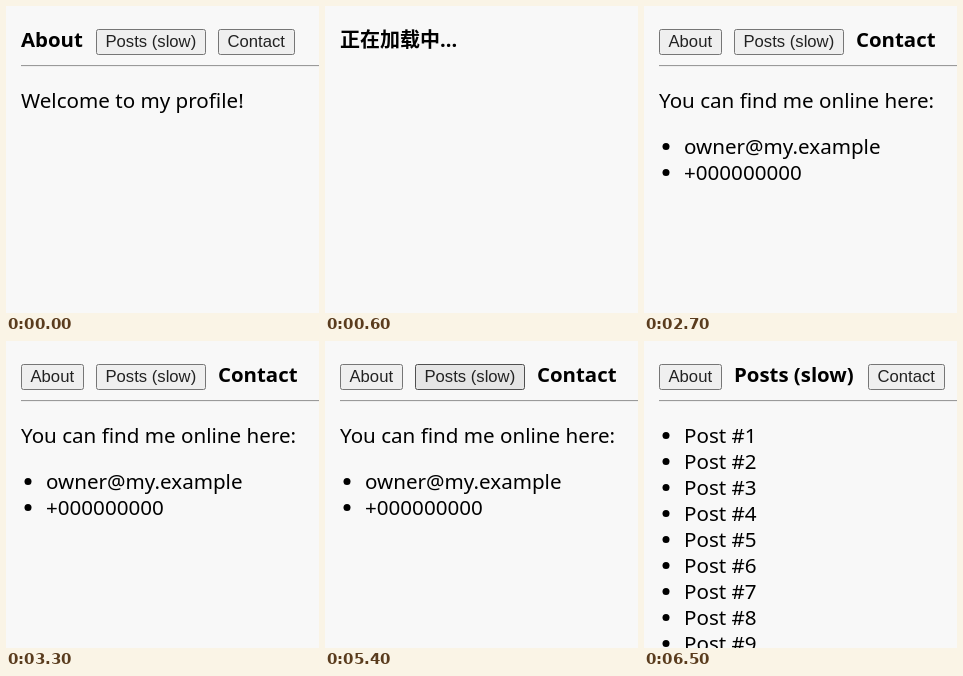
An HTML page for the animation above (7100 ms loop, 313 px wide and 307 px high).

```html
<!DOCTYPE html>
<html lang="en">
<head>
<meta charset="utf-8">
<title>Tabs</title>
<style>
  html, body { margin: 0; width: 100%; height: 100%; overflow: hidden; background: #f8f8f8; }
  svg { display: block; }
  text { font: 20.6px "Noto Sans", "Noto Sans CJK SC", sans-serif; fill: #000; white-space: pre; }
  .title { font-size: 20.4px; font-weight: 700; }
  .loading { font-size: 20px; font-weight: 700; }
  .button text { font: 16.67px "Liberation Sans", Arial, sans-serif; fill: #222; }
  .button rect { fill: #efefef; stroke: #767676; }
  .button.hover rect { fill: #e5e5e5; stroke: #4f4f4f; }
</style>
</head>
<body>
<svg id="stage" width="313" height="307" viewBox="0 0 313 307"></svg>
<script>
const LOOP = 7100;

const TABS = {
  about: { label: 'About', width: 63 },
  posts: { label: 'Posts (slow)', width: 110 },
  contact: { label: 'Contact', width: 77 }
};

// x holds the left edge of each tab
const PAGES = {
  about: { x: [15, 90, 212], intro: 'Welcome to my profile!', items: [] },
  posts: { x: [15, 90, 224], items: Array.from({ length: 9 }, (_, i) => `Post #${i + 1}`) },
  contact: {
    x: [15, 90, 212],
    intro: 'You can find me online here:',
    items: ['owner@my.example', '+000000000']
  }
};

// Start time, page, hovered tab
const STEPS = [
  [0, 'about'],
  [100, 'about', 'contact'],
  [200, 'about'],
  [300, 'about', 'posts'],
  [600, 'loading'],
  [1600, 'posts', 'contact'],
  [2700, 'contact'],
  [3200, 'contact', 'posts'],
  [3300, 'contact'],
  [3400, 'contact', 'about'],
  [3900, 'contact'],
  [5400, 'contact', 'posts'],
  [5500, 'loading'],
  [6500, 'posts']
];

const text = (x, y, value, cls = '') => `<text class="${cls}" x="${x}" y="${y}">${value}</text>`;

function button(x, { label, width }, hovered) {
  return `<g class="button${hovered ? ' hover' : ''}">
    <rect x="${x + .5}" y="23.5" width="${width - 1}" height="25" rx="2"/>
    ${text(x + 9.5, 41, label)}</g>`;
}

function render(name, hovered) {
  if (name === 'loading') return text(15, 41, '正在加载中...', 'loading');
  const page = PAGES[name];
  const tabs = Object.keys(TABS).map((key, i) => key === name
    ? text(page.x[i], 41, TABS[key].label, 'title')
    : button(page.x[i], TABS[key], key === hovered));
  const rule = '<path d="M15 59.5H313" stroke="#9a9a9a"/><path d="M15 60.5H313" stroke="#eee"/>';
  const intro = page.intro ? text(15, 102, page.intro) : '';
  const top = page.intro ? 148 : 102;
  const items = page.items.map((item, i) => {
    const y = top + i * 26;
    return `<circle cx="22" cy="${y - 7.5}" r="3.5"/>${text(40, y, item)}`;
  });
  return [...tabs, rule, intro, ...items].join('');
}

const stage = document.getElementById('stage');
const start = performance.now();
let current;

function tick() {
  const time = (performance.now() - start) % LOOP;
  const step = STEPS.filter(([from]) => from <= time).pop();
  if (step !== current) {
    current = step;
    stage.innerHTML = render(step[1], step[2]);
  }
  requestAnimationFrame(tick);
}
tick();
</script>
</body>
</html>
```
